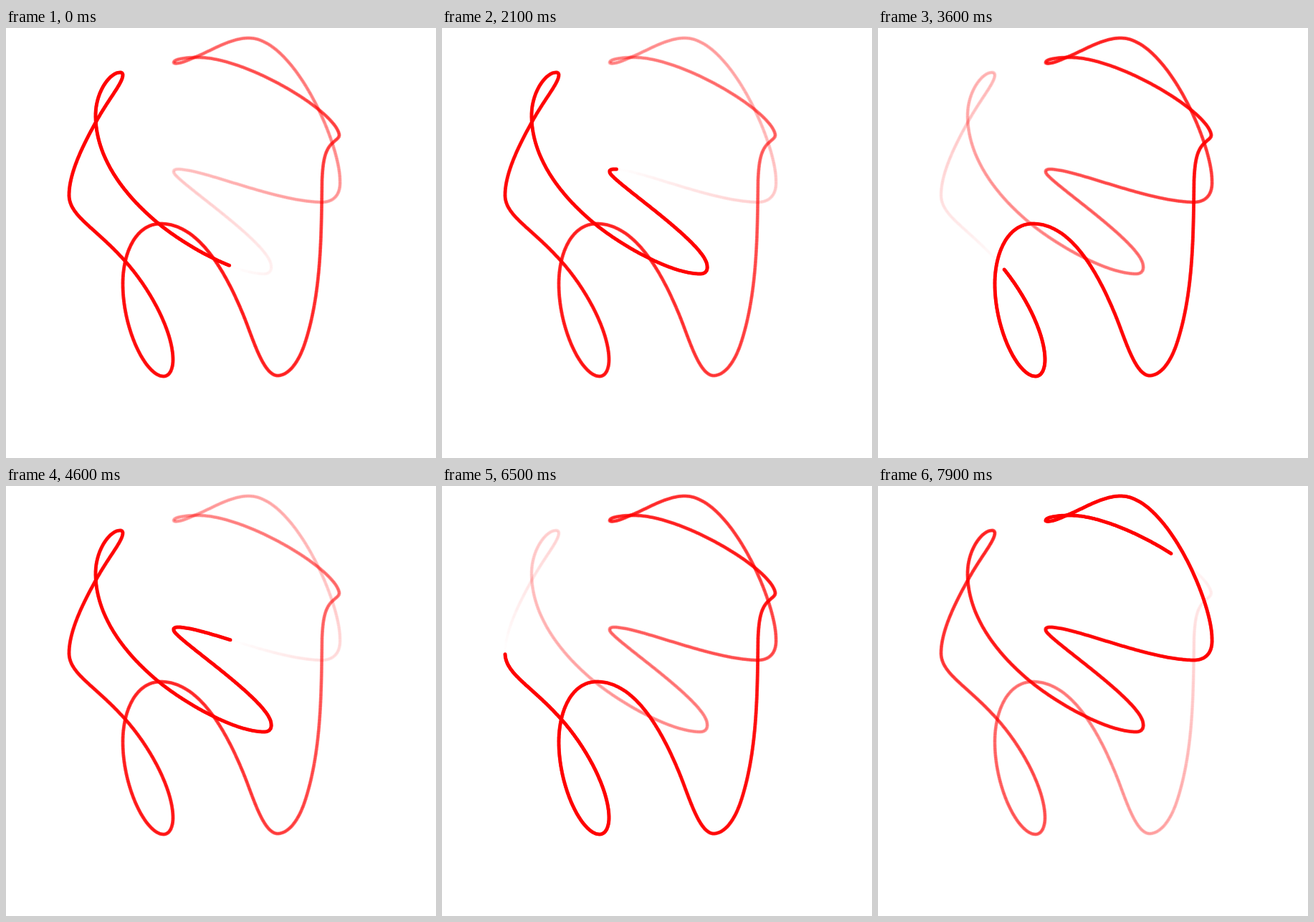
These frames come from a looping animation (600x600 px, 8000 ms). An HTML page with a canvas:

```html
<!DOCTYPE html>
<html lang="en">
<head>
<meta charset="utf-8">
<title>Fading red trail</title>
<style>
  html, body { margin: 0; width: 100%; height: 100%; overflow: hidden; background: #fff; }
  canvas { display: block; width: 600px; height: 600px; }
</style>
</head>
<body>
<canvas id="stage" width="600" height="600"></canvas>
<script>
const LOOP = 8000, STEP = 100, RADIUS = 2.5, SPACING = 1.67;

const curve = document.createElementNS('http://www.w3.org/2000/svg', 'path');
curve.setAttribute('d', `M360 343
  C367 343 371 339 370 332 C369 300 234 212 234 201
  C233 198 236 197 241 197 C278 198 376 242 440 243
  C459 243 467 231 466 213 C466 160 401 14 339 14
  C313 14 288 31 263 41 C254 45 247 48 241 49
  C236 50 233 49 234 47.5 C236 43 252 41 268 41
  C335 41 460 116 465 149 C465.5 153 460 156 455 161
  C444 171 442 190 441 212 C440 290 440 370 417 440
  C408 467 394 485 379 485 C360 485 346 438 333 405
  C308 343 270 273 216 273 C181 273 163 314 163 357
  C163 420 195 486 220 486 C228 486 233 476 233 463
  C233 424 202 365 166 325 C124 278 88 262 88 233
  C88 203 107 164 125 132 C143 99 162 78 163 66
  C163 63 162 62 159 62 C145 62 125 89 125 122
  C125 183 168 236 213 273 C255 307 322 343 360 343`);

const length = curve.getTotalLength();
const count = Math.round(length / SPACING);
const dots = Array.from({ length: count }, (_, i) => curve.getPointAtLength(i * length / count));

// Times at which the head passes known points of the curve
const passes = [
  [0, 311, 332], [1200, 164, 336], [2100, 243, 197], [3600, 176, 338],
  [5700, 417, 440], [7200, 233, 201], [7900, 410, 94]
];

function nearestDot(x, y) {
  let best = 0, bestDistance = Infinity;
  dots.forEach((p, i) => {
    const distance = Math.hypot(p.x - x, p.y - y);
    if (distance < bestDistance) { best = i; bestDistance = distance; }
  });
  return best;
}

const keys = [];
for (const [time, x, y] of passes) {
  let position = nearestDot(x, y);
  const previous = keys[keys.length - 1];
  while (previous && position <= previous.position) position += count;
  keys.push({ time, position });
}
keys.forEach((key, i) => {
  const before = keys[Math.max(i - 1, 0)];
  const after = keys[Math.min(i + 1, keys.length - 1)];
  key.speed = (after.position - before.position) / (after.time - before.time);
});

// Cubic Hermite interpolation between passes
function headAt(time) {
  const last = keys[keys.length - 1];
  if (time >= last.time) return last.position + last.speed * (time - last.time);
  const i = keys.findIndex(key => key.time > time) - 1;
  const a = keys[i], b = keys[i + 1];
  const span = b.time - a.time, u = (time - a.time) / span, v = 1 - u;
  return a.position * v * v * (1 + 2 * u) + a.speed * span * u * v * v
       + b.position * u * u * (1 + 2 * v) - b.speed * span * u * u * v;
}

const ctx = document.getElementById('stage').getContext('2d');

function draw(time) {
  const head = Math.round(headAt(time));
  ctx.globalAlpha = 1;
  ctx.fillStyle = '#fff';
  ctx.fillRect(0, 0, 600, 600);
  ctx.fillStyle = '#f00';
  for (let age = count - 1; age >= 0; age--) {
    const p = dots[(head - age + count) % count];
    ctx.globalAlpha = 1 - age / count;
    ctx.beginPath();
    ctx.arc(p.x, p.y, RADIUS, 0, 2 * Math.PI);
    ctx.fill();
  }
}

const start = performance.now();
let shown = 0;
function tick() {
  const elapsed = (performance.now() - start) % LOOP;
  const time = Math.floor(elapsed / STEP) * STEP;
  if (time !== shown) draw(shown = time);
  requestAnimationFrame(tick);
}
draw(0);
requestAnimationFrame(tick);
</script>
</body>
</html>
```
